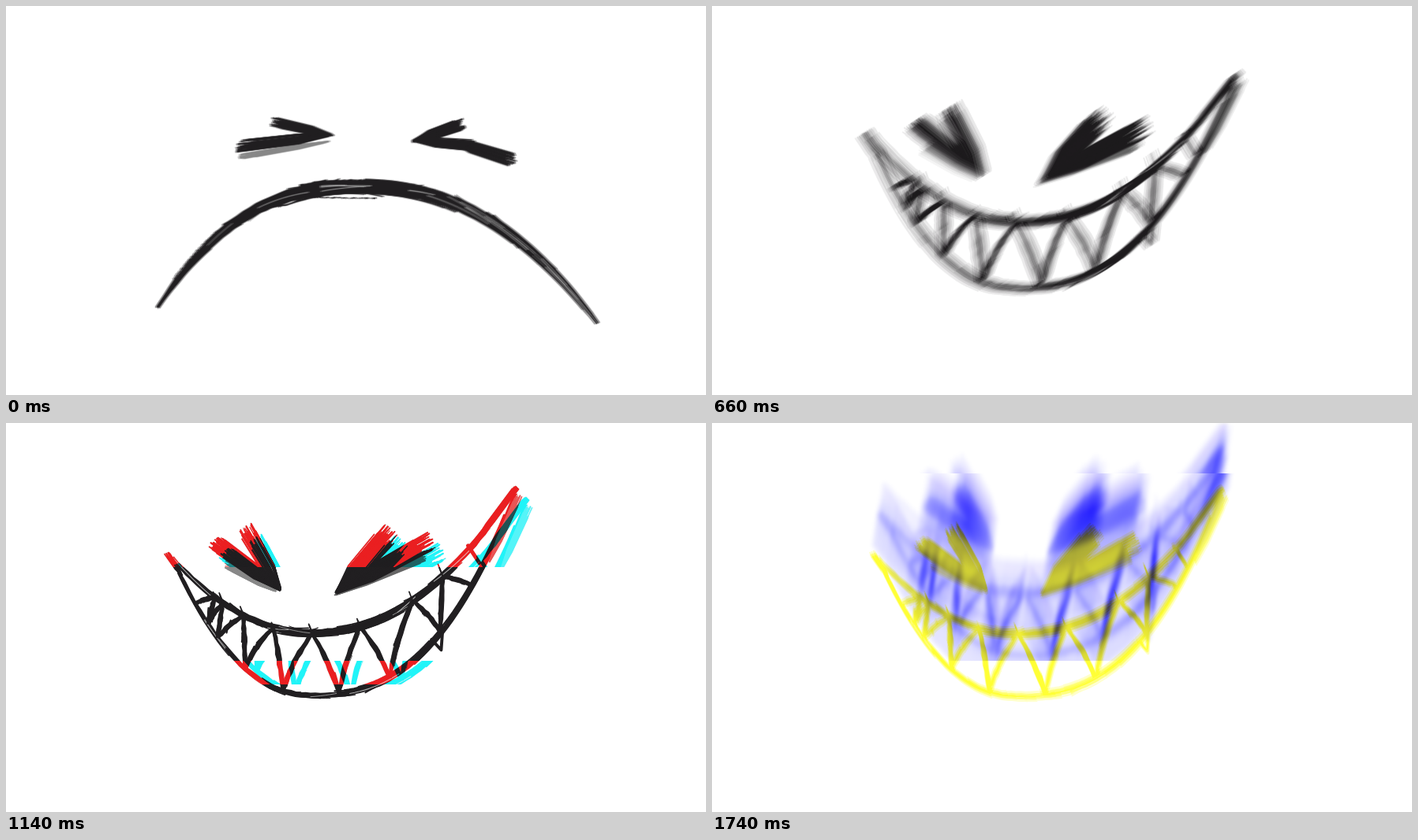
Write an HTML page with a canvas that moves like this. It is 887 px wide and 494 px high and loops after 1.8 s.

```html
<!DOCTYPE html>
<html lang="en">
<head>
<meta charset="utf-8">
<title>Frown to grin</title>
<style>
html, body { margin: 0; width: 100%; height: 100%; overflow: hidden; background: #fff; }
canvas { display: block; }
</style>
</head>
<body>
<canvas id="stage" width="887" height="494"></canvas>
<script>
const W = 887, H = 494, STEP = 60, STEPS = 30, INK = '#211f21';
const WHIP = 8, GRIN = 10, GLITCH = 19, STREAK = 28; // first step of each phase
const stage = document.getElementById('stage').getContext('2d');
const layer = () => {
  const c = document.createElement('canvas');
  c.width = W;
  c.height = H;
  return c.getContext('2d');
};
const sheet = layer(), soft = layer(), tint = layer();

let seed = 1;
const rnd = () => (seed = (seed * 16807) % 2147483647) / 2147483647;
const vary = a => (rnd() * 2 - 1) * a;
const mix = (a, b, t) => a + (b - a) * t;
const clamp = v => Math.max(0, Math.min(1, v));
const hump = u => Math.sin(Math.PI * clamp(u));

function clear(g) {
  g.setTransform(1, 0, 0, 1, 0, 0);
  g.globalAlpha = 1;
  g.globalCompositeOperation = 'source-over';
  g.fillStyle = '#fff';
  g.fillRect(0, 0, W, H);
}

function line(g, pts, width, color = INK) {
  g.strokeStyle = color;
  g.lineWidth = width;
  g.beginPath();
  pts.forEach(p => g.lineTo(p[0], p[1]));
  g.stroke();
}

// Points of a function over a range, evenly spaced
const along = (x0, x1, f, n = 70) =>
  Array.from({ length: n + 1 }, (_, i) => [mix(x0, x1, i / n), f(mix(x0, x1, i / n))]);

// Power curve that turns at (x0, y0), with its own reach on each side
const turn = (x0, y0, left, right) => x => {
  const [reach, rise, power] = x < x0 ? left : right;
  return y0 + rise * (Math.abs(x - x0) / reach) ** power;
};

// A stroke of changing width, roughened by loose hairs and thin gaps
function brush(g, s, width, hairs = 0, gaps = 0) {
  const n = s.length - 1;
  const side = (i, d) => {
    const a = s[Math.max(0, i - 1)], b = s[Math.min(n, i + 1)];
    const l = Math.hypot(b[0] - a[0], b[1] - a[1]) || 1;
    return [s[i][0] - (b[1] - a[1]) / l * d, s[i][1] + (b[0] - a[0]) / l * d];
  };
  const edge = k => s.map((p, i) => side(i, k * width(i / n) / 2 + vary(.6)));
  g.fillStyle = INK;
  g.beginPath();
  edge(-1).concat(edge(1).reverse()).forEach(p => g.lineTo(p[0], p[1]));
  g.fill();
  for (let h = 0; h < hairs + gaps; h++) {
    const gap = h >= hairs, i0 = Math.floor(rnd() * n * .9);
    const i1 = Math.min(n, i0 + 4 + Math.floor(rnd() * n * (gap ? .1 : .2)));
    const r = gap ? .35 : .65, d0 = vary(r), d1 = vary(r), hair = [];
    for (let i = i0; i <= i1; i++) {
      hair.push(side(i, width(i / n) * mix(d0, d1, (i - i0) / (i1 - i0 || 1))));
    }
    line(g, hair, .6 + rnd() * (gap ? .6 : 1.6), gap ? '#aaa' : INK);
  }
}

// Bristle marks that fan out from a tip and end raggedly
function lobe(g, [ax, ay], [bx, by], width, color = INK) {
  const l = Math.hypot(bx - ax, by - ay), nx = -(by - ay) / l, ny = (bx - ax) / l;
  for (let i = 0; i < width * 2.4; i++) {
    const d = vary(width / 2), end = .84 + rnd() * .2;
    const at = (k, o) => [mix(ax, bx, k) + nx * o, mix(ay, by, k) + ny * o];
    line(g, [at(rnd() * .12, d * .15), at(.35, d * .85), at(end, d)], 1 + rnd() * 1.4, color);
  }
}

const sadArch = turn(454, 230, [262, 153, 2.6], [295, 173, 2.25]);
const topLip = turn(415, 270, [187, -103, 2.1], [261, -181, 2.05]);
const lowLip = turn(415, 351, [185, -179, 2.4], [259, -254, 2.4]);
// Zigzag of the teeth, from the low lip to the top lip and back
const ZIGZAG = [256, 282, 272, 292, 284, 318, 318, 356, 366, 406, 438, 468, 504, 537, 572, 577, 615];

function drawSad(g) {
  brush(g, along(192, 749, sadArch), u => 4 + 14 * hump(u) ** .7, 60, 16);
  brush(g, along(372, 558, x => sadArch(x) - 8), u => 4 * (1 - u) + 1);
  brush(g, along(345, 469, x => sadArch(x) + 14 - 10 * hump((469 - x) / 248) ** 4), () => 1.4);
  brush(g, along(212, 268, x => sadArch(x) - 8), () => 1);
  lobe(g, [415, 164], [339, 147], 12);
  lobe(g, [410, 172], [299, 191], 7, '#888');
  lobe(g, [412, 164], [296, 178], 15);
  lobe(g, [515, 172], [578, 150], 15);
  lobe(g, [517, 171], [592, 177], 14);
  lobe(g, [560, 170], [643, 196], 17);
}

// Arch the grin: m = 0 is a toothy frown, m = 1 the full grin
function bend([x, y], m) {
  if (m === 1) return [x, y];
  const u = (x - 228) / 448, k = (2 * u - 1) ** 2, top = topLip(x);
  const v = clamp((y - top) / Math.max(5, lowLip(x) - top));
  return [mix(203 + 512 * u, x, m), mix(222 + 145 * k + v * (60 - 50 * k), y, m)];
}

function drawMouth(g, m) {
  const to = pts => pts.map(p => bend(p, m));
  brush(g, to(along(228, 676, topLip)), u => 5 + 5.5 * hump(u), 44, 6);
  brush(g, to(along(230, 674, lowLip)), u => 4.5 + 3 * hump(u), 40, 4);
  for (let i = 0; i < ZIGZAG.length - 1; i++) {
    let [low, top] = [ZIGZAG[i], ZIGZAG[i + 1]];
    if (i % 2) [low, top] = [top, low];
    const over = 4 + rnd() * 12, y0 = topLip(top), y1 = lowLip(low);
    const tooth = Array.from({ length: 13 }, (_, j) => {
      const k = j / 12;
      return [mix(top, low, k) + (low - top) * .1 * hump(k), mix(y0, y1, k)];
    });
    brush(g, to(tooth), u => 4.5 + 2.5 * hump(u), 5);
    if (m === 1) line(g, [[top - over * .35, y0 - over], [top, y0]], 1.8);
  }
  if (m < 1) return;
  line(g, [[611, 163], [625, 186]], 5);
  line(g, [[560, 283], [572, 297], [575, 268]], 4);
  lobe(g, [240, 190], [222, 161], 7);
  lobe(g, [638, 185], [678, 103], 9, '#555');
  lobe(g, [615, 165], [677, 88], 7);
}

function drawGlare(g) {
  lobe(g, [362, 215], [298, 178], 9, '#888');
  lobe(g, [367, 213], [284, 149], 21);
  lobe(g, [367, 213], [324, 133], 21);
  lobe(g, [436, 222], [552, 178], 9, '#666');
  lobe(g, [438, 219], [511, 142], 27);
  lobe(g, [440, 218], [561, 156], 23);
}

// Half-formed eyes, lip and tooth strokes in the whip between faces
function drawWhip(g) {
  clear(g);
  lobe(g, [386, 158], [222, 202], 28, '#888');
  lobe(g, [352, 172], [206, 258], 13);
  lobe(g, [420, 178], [606, 206], 30, '#888');
  lobe(g, [412, 179], [566, 150], 22, '#333');
  const arch = u => 228 + 160 * (2 * u - 1) ** 2;
  line(g, along(0, 1, arch).map(([u, y]) => [184 + 508 * u, y]), 13, '#777');
  line(g, [[468, 304], [484, 268], [507, 240]], 7);
  line(g, [[562, 324], [569, 290], [586, 268]], 7);
}

// Sad face drifts right while shrinking, then is thrown left
function sadPose(t) {
  const p = clamp(t / 300), q = clamp((t - 300) / 180);
  return { x: 51 * Math.sin(p * Math.PI / 2) - 150 * q ** 3, y: 8 * p + 10 * q,
    scale: 1 - .068 * p ** 1.6, turn: 0 };
}

// Grin shakes to rest, then leans back slowly
function grinPose(t) {
  const a = (1 - clamp((t - 600) / 180)) ** 2, p = clamp((t - 780) / 360);
  const shake = a * Math.cos((t - 600) / STEP * Math.PI);
  return { x: 45 * shake - 19 * p, y: 9 * a - 4 * p, scale: 1 + .08 * a - .02 * p,
    turn: -.031 * p, shake };
}

// Average copies of a layer between two offsets, densest halfway
function smear(src, ax, ay, bx, by) {
  const n = Math.max(2, Math.min(40, Math.ceil(Math.hypot(bx - ax, by - ay) / 2)));
  clear(soft);
  for (let i = 0; i < n; i++) {
    const u = i / (n - 1), k = u + .1 * Math.sin(2 * Math.PI * u);
    soft.globalAlpha = 1 / (i + 1);
    soft.drawImage(src.canvas, mix(ax, bx, k), mix(ay, by, k));
  }
  soft.globalAlpha = 1;
}

// Draw the face on the sheet and return its motion blur
function drawFace(step) {
  const t = step * STEP, g = sheet;
  clear(g);
  g.lineCap = g.lineJoin = 'round';
  seed = 4217;
  if (step < WHIP) {
    const { x, y, scale } = sadPose(t), next = sadPose(t + STEP / 2), last = sadPose(t - STEP / 2);
    g.setTransform(scale, 0, 0, scale, x, y);
    drawSad(g);
    return [(next.x - last.x) * .3, (last.y - next.y) * .5];
  }
  if (step < GRIN) {
    const m = (step - WHIP) * .4;
    drawMouth(g, m);
    if (m) drawGlare(g);
    return [-26 * (1 - m), 45 * (1 - m)];
  }
  const { x, y, scale, turn, shake } = grinPose(t);
  g.translate(440 + x, 260 + y);
  g.rotate(turn);
  g.scale(scale, scale);
  g.translate(-440, -260);
  drawMouth(g, 1);
  drawGlare(g);
  return [40 * shake, -26 * shake];
}

// Glitch bands: top, bottom, red shift x, y, blue shift x, y
const BURSTS = [
  [[0, 183, 13, 14, 0, 0], [302, 332, 15, 3, 0, 0]],
  [[0, 118, 0, 0, 11, 3], [118, 208, 10, 13, 0, 0], [208, 235, 11, 13, 14, 8], [235, H, 11, 13, 0, 0]]
];
const PARTS = ['#00f4f8', '#ea00ff', '#ff0'];

// Lay one colour part of a layer over a band of the stage
function lay(src, color, x, y, top, bottom, alpha = 1) {
  clear(tint);
  tint.drawImage(src.canvas, x, y);
  tint.globalCompositeOperation = 'lighten';
  tint.fillStyle = color;
  tint.fillRect(0, 0, W, H);
  stage.save();
  stage.beginPath();
  stage.rect(0, top, W, bottom - top);
  stage.clip();
  stage.globalCompositeOperation = 'multiply';
  stage.globalAlpha = alpha;
  stage.drawImage(tint.canvas, 0, 0);
  stage.restore();
}

// Each burst starts at its key bands and wanders off for four steps
function split(step) {
  const age = step - GLITCH, roam = age % 4;
  const bands = BURSTS[Math.floor(age / 4) % 2];
  seed = 913 + step * 7919;
  stage.drawImage(sheet.canvas, 0, 0);
  for (const [top, bottom, rx, ry, bx, by] of bands) {
    const move = Math.round(vary(14) * roam), grow = 1 + vary(.15) * roam;
    const y0 = Math.max(0, top + move), y1 = Math.min(H, bottom + move);
    stage.fillStyle = '#fff';
    stage.fillRect(0, y0, W, y1 - y0);
    [[rx, ry], [0, 0], [bx, by]].forEach(([x, y], i) =>
      lay(sheet, PARTS[i], x * grow, y * grow, y0, y1));
  }
}

// Yellow stays while blue streaks upward
function streak(step) {
  const k = (step - STREAK + 1) / 2;
  smear(sheet, -1, -2, 1, 4);
  lay(soft, '#ff0', 0, 0, 0, H, .9);
  smear(sheet, 2, -12 * k, 14, -90 * k);
  tint.filter = 'blur(2px)';
  lay(soft, '#00f', -8, 0, 0, 64);
  lay(soft, '#00f', 0, 0, 64, 302);
  tint.filter = 'none';
}

function render(step) {
  const [bx, by] = drawFace(step);
  clear(stage);
  if (step >= STREAK) return streak(step);
  if (step >= GLITCH) return split(step);
  if (Math.hypot(bx, by) < 2) return stage.drawImage(sheet.canvas, 0, 0);
  const whip = step === WHIP ? 0 : .5;
  smear(sheet, -bx * whip, -by * whip, bx * (1 - whip), by * (1 - whip));
  stage.drawImage(soft.canvas, 0, 0);
  if (step === WHIP) {
    drawWhip(sheet);
    stage.globalCompositeOperation = 'multiply';
    stage.filter = 'blur(4px)';
    stage.drawImage(sheet.canvas, 0, 0);
    stage.filter = 'none';
  }
}

let shown = -1;
const start = performance.now();
function tick() {
  const step = Math.floor((performance.now() - start) / STEP) % STEPS;
  if (step !== shown) render(shown = step);
  requestAnimationFrame(tick);
}
tick();
</script>
</body>
</html>
```
